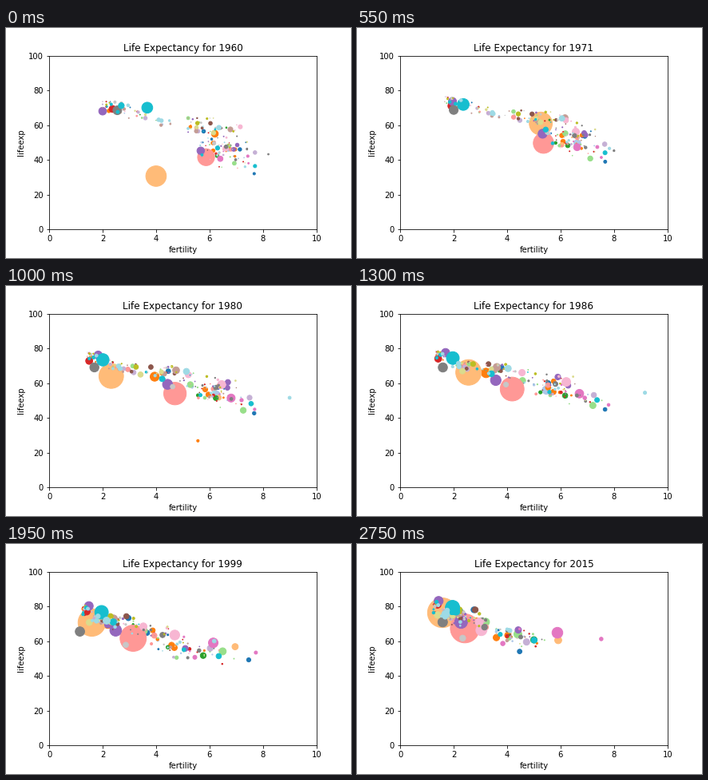
These frames come from a looping animation (432x288 px, 2.8 s). A matplotlib script:

```python
import numpy as np
import matplotlib.pyplot as plt
from matplotlib.animation import FuncAnimation

START, COUNT = 1960, 56
YEARS = np.arange(START, START + COUNT)
U = np.linspace(0, 1, COUNT)

rng = np.random.default_rng(12)
tracks = []  # (colour index, fertility, life expectancy, population in millions)


def country(hue, pop, fert, life, middle, width=7, bend=0.72, shocks=()):
    """Add a dot moving from first to last values of pop, fert and life.

    Fertility falls on a logistic curve around the year `middle`, life
    expectancy follows a power curve, and each shock (year, width,
    fertility change, life change) adds a bell-shaped detour.
    """
    fall = 1 / (1 + np.exp((YEARS - middle) / width))
    fall = (fall - fall[-1]) / (fall[0] - fall[-1])
    f = fert[1] + (fert[0] - fert[1]) * fall
    l = life[0] + (life[1] - life[0]) * U ** bend
    for year, spread, df, dl in shocks:
        bell = np.exp(-((YEARS - year) / spread) ** 2)
        f = f + df * bell
        l = l + dl * bell
    p = pop[0] + (pop[1] - pop[0]) * U ** 0.9
    tracks.append((hue, f, l, p))


def crowd(n, fert0, life0, fert1, life1, middle, growth, dip=0):
    """Add n random countries; the richer ones change earlier."""
    def pick(span, q):
        return span[0] + (span[1] - span[0]) * np.clip(q, 0, 1)

    for _ in range(n):
        q = rng.random() + rng.normal(0, 0.22, 5)
        pop = np.clip(np.exp(rng.normal(0.3, 1.8)), 0.03, 20)
        country(int(rng.integers(20)), (pop, pop * growth),
                (pick(fert0, 1 - q[0]), pick(fert1, 1 - q[1])),
                (pick(life0, q[2]), pick(life1, q[3])),
                pick(middle, 1 - q[4]),
                shocks=[(2000, 9, 0, -dip * rng.random())])


# The most populous countries
country(3, (658, 1376), (6.2, 1.58), (57, 76.3), 1974.5, 2.6, 1,
        [(1960, 2.5, -2.2, -26.4), (1987, 6, 0.95, 0)])
country(7, (449, 1311), (5.87, 2.42), (41.5, 67.3), 1986, 12)
country(18, (186, 322), (3.67, 1.96), (70, 79.3), 1965, 4, 1)
country(8, (88, 258), (5.67, 2.28), (45.2, 71), 1983, 6, 0.6)
country(2, (72, 208), (6.2, 1.78), (55, 75.5), 1977, 10, 0.85)
country(14, (120, 143), (2.55, 1.6), (68.5, 71), 1968, 5, 1.5,
        [(1999, 8, -0.45, -4.5)])
country(8, (93, 127), (2.0, 1.44), (68, 83.1), 1985, 6, 0.62)
country(13, (45, 189), (6.6, 3.04), (46.6, 66.3), 1999, 6, 0.45)
country(1, (49, 161), (6.7, 2.13), (46.5, 71.5), 1991, 5, 1.3)
country(12, (45, 182), (6.35, 5.88), (40.6, 64.8), 1990, 12, 0.8,
        [(1982, 14, 0.6, 0)])
country(11, (38, 127), (6.78, 2.2), (57.5, 76.5), 1981, 6, 0.65)
country(6, (73, 81), (2.37, 1.4), (69.3, 81), 1971, 4, 1.2)
country(19, (33, 93), (6.35, 1.7), (58.5, 75.5), 1986, 6)
country(13, (26, 102), (7.15, 2.96), (59, 71), 1978, 12)
country(18, (27, 78), (6.3, 2.1), (46.8, 77), 1979, 8, 0.65)
country(17, (27, 68), (6.15, 1.4), (55.5, 75), 1978, 5.5)
country(5, (27, 91), (6.72, 3.2), (48, 71), 1982, 8)
country(5, (22, 99), (6.88, 4.4), (38, 64), 2007, 5, 1.4,
        [(1982, 15, 0.4, 0)])
country(3, (15, 77), (6.0, 5.75), (43, 60.5), 1990, 8, 0.7,
        [(1995, 14, 1.25, 0)])
country(8, (22, 79), (6.9, 1.72), (46, 76), 1991, 3.5)
country(18, (52, 64), (2.7, 1.9), (71.2, 81), 1972, 4, 1.1)
country(15, (17, 55), (6.17, 2.34), (49.5, 63.5), 1982, 10, 0.5,
        [(2006, 7, 0, -9.5)])

# Countries with an unusual path
country(2, (5.7, 15.5), (6.95, 2.65), (42, 68), 1995, 7, 0.9,
        [(1978, 4, -1.2, -33)])
country(14, (3, 11.6), (8.2, 4.0), (43.2, 66), 1993, 8, 1.5,
        [(1994, 1, 0, -31), (1995, 6, 0, -10)])
country(7, (3.9, 10.7), (6.3, 3.0), (43, 64), 1991, 9, 0.9,
        [(2010, 0.5, 0, -30)])
country(19, (5, 27), (7.3, 4.1), (36, 66), 1999, 5, 0.65,
        [(1985, 12, 2.1, 0)])
country(12, (3.4, 20), (7.45, 7.5), (38, 61.2), 1990, 10, 1.2,
        [(1990, 15, 0.35, 0)])
country(0, (9, 33), (7.67, 4.47), (32, 54), 2009, 3.5)

# Everyone else: developed, early, later and last to change
crowd(36, (2.0, 3.6), (64, 73.5), (1.25, 1.95), (73, 82.5), (1969, 1980), 1.2)
crowd(14, (3.4, 5.3), (58, 66), (1.5, 2.3), (71, 79), (1972, 1984), 1.8)
crowd(62, (5.2, 7.4), (46, 64), (1.8, 3.2), (68, 78), (1973, 1996), 2.6)
crowd(44, (5.7, 7.7), (35, 50), (3.6, 5.4), (57, 67), (1990, 2006), 3.2, dip=8)

tracks.sort(key=lambda item: item[0])
hues = [item[0] for item in tracks]
fert, life, pop = (np.array([item[k] for item in tracks]) for k in (1, 2, 3))

fig, ax = plt.subplots(figsize=(6, 4), dpi=72)
fig.subplots_adjust(left=0.125, right=0.9, bottom=0.125, top=0.88)
dots = ax.scatter(fert[:, 0], life[:, 0], s=pop[:, 0],
                  c=[plt.get_cmap("tab20")(h) for h in hues])
ax.set_xlim(0, 10)
ax.set_ylim(0, 100)
ax.set_xlabel("fertility")
ax.set_ylabel("lifeexp")
title = ax.set_title(f"Life Expectancy for {START}")


def update(i):
    dots.set_offsets(np.column_stack((fert[:, i], life[:, i])))
    dots.set_sizes(pop[:, i])
    title.set_text(f"Life Expectancy for {START + i}")
    return dots, title


anim = FuncAnimation(fig, update, frames=COUNT, interval=50, repeat=True,
                     repeat_delay=0, blit=False)
plt.show()
```
